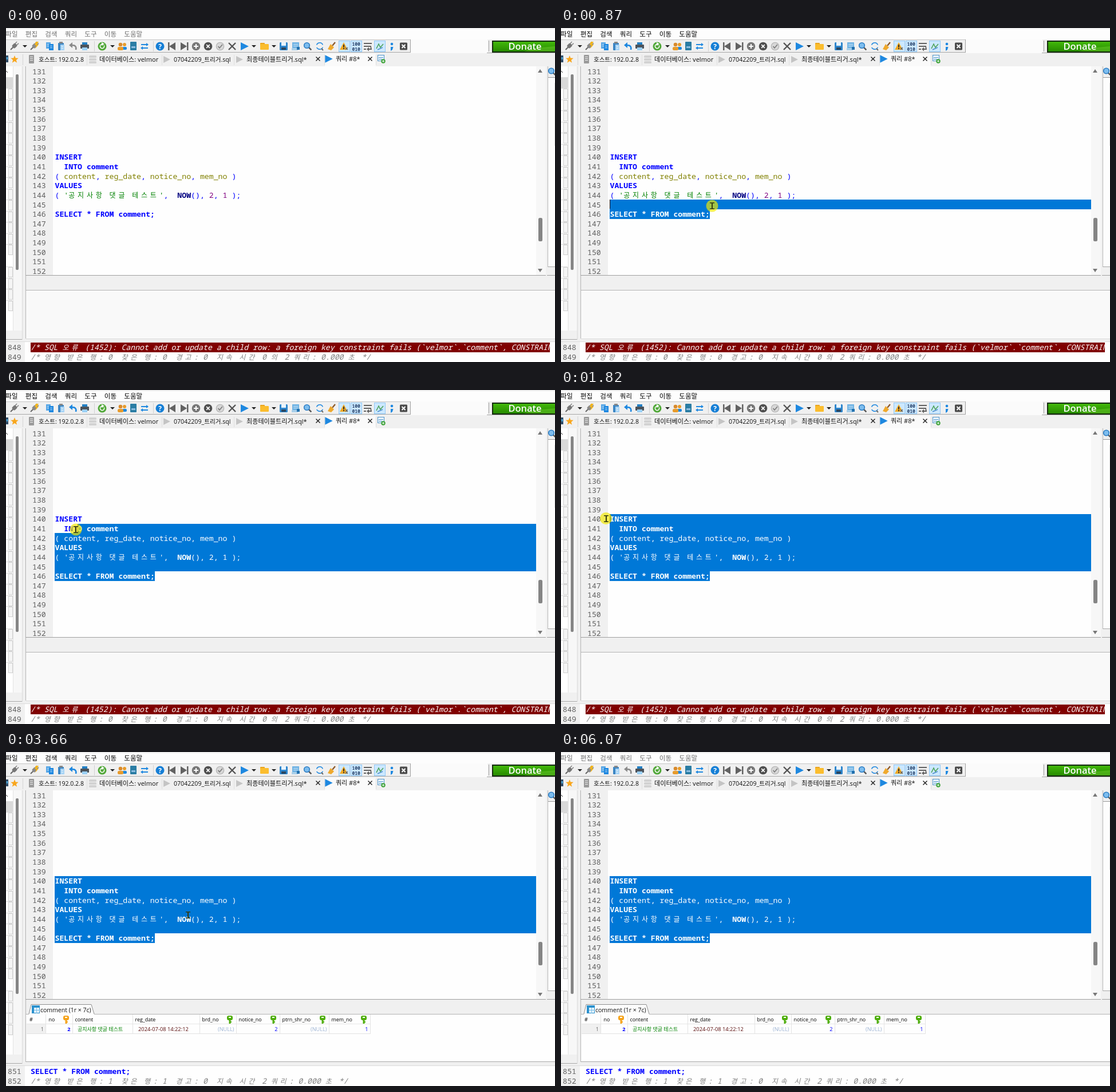
An HTML page with a canvas for the animation above (6.14 s loop, 959 by 584 pixels).

```html
<!DOCTYPE html>
<html lang="ko">
<head>
<meta charset="utf-8">
<style>
html, body { margin: 0; width: 100%; height: 100%; overflow: hidden; background: #f0f0f0; }
canvas { display: block; width: 959px; height: 584px; }
</style>
</head>
<body>
<canvas id="stage" width="959" height="584"></canvas>
<script>
const c = document.getElementById('stage').getContext('2d');
const LOOP = 6140;
const UI = "'Open Sans', 'Noto Sans CJK KR', sans-serif";
const MONO = "'Noto Sans Mono', 'Noto Sans CJK KR', monospace";
const CELL = 7.92, ROW = 16.64, CODE_X = 85.5;
const BLUE = '#0000ff', SEL = '#0078d7', GREY = '#f0f0f0', ICON = '#1e88e0';

// ---------- drawing helpers ----------
function box(x, y, w, h, fill, stroke) {
  if (fill) { c.fillStyle = fill; c.fillRect(x, y, w, h); }
  if (stroke) { c.strokeStyle = stroke; c.lineWidth = 1; c.strokeRect(x + .5, y + .5, w - 1, h - 1); }
}
function pill(x, y, w, h, r, fill) {
  c.fillStyle = fill;
  c.beginPath(); c.roundRect(x, y, w, h, r); c.fill();
}
function poly(pts, fill) {
  c.fillStyle = fill;
  c.beginPath();
  for (let i = 0; i < pts.length; i += 2) c.lineTo(pts[i], pts[i + 1]);
  c.closePath(); c.fill();
}
function line(pts, color, w = 1) {
  c.strokeStyle = color; c.lineWidth = w;
  c.beginPath();
  for (let i = 0; i < pts.length; i += 2) c.lineTo(pts[i], pts[i + 1]);
  c.stroke();
}
function disc(x, y, r, fill) {
  c.fillStyle = fill;
  c.beginPath(); c.arc(x, y, r, 0, 7); c.fill();
}
function arc(x, y, r, a, b, color, w) {
  c.strokeStyle = color; c.lineWidth = w;
  c.beginPath(); c.arc(x, y, r, a, b); c.stroke();
}
function label(s, x, y, size, color, weight = 400, align = 'left') {
  c.font = `${weight} ${size}px ${UI}`;
  c.fillStyle = color; c.textAlign = align;
  c.fillText(s, x, y);
  c.textAlign = 'left';
}
const isWide = ch => ch >= '가' && ch <= '힣';
// Monospaced text on a cell grid; Hangul takes two cells. Returns the next x.
function mono(s, x, y, color, style = '500') {
  c.fillStyle = color;
  for (const ch of s) {
    const wide = isWide(ch);
    c.font = `${wide ? style.replace('bold', '') : style} ${wide ? 12 : 13.2}px ${MONO}`;
    if (ch !== ' ') c.fillText(ch, x, y);
    x += wide ? 2 * CELL : CELL;
  }
  return x;
}
const play = (x, y, color, s = 1) => poly([x - 7 * s, y - 7 * s, x + 7 * s, y, x - 7 * s, y + 7 * s], color);
const drop = x => poly([x - 4, 30, x + 4, 30, x, 34], '#222');
const cross = (x, y, r, color, w) => {
  line([x - r, y - r, x + r, y + r], color, w);
  line([x + r, y - r, x - r, y + r], color, w);
};
function lens(x, y, r) {
  line([x + r * .5, y + r * .5, x + r + 3, y + r + 3], '#555', 2.5);
  disc(x, y, r, '#7dbdee'); arc(x, y, r, 0, 7, '#2c7dc4', 1.6);
}
function floppy(x, y) {
  pill(x - 7, y - 7, 14, 14, 1.5, '#2f86cc');
  box(x - 4, y - 7, 8, 6, '#e8f4ff'); box(x - 4, y + 2, 8, 4, '#2a4660');
}
function sheet(x, y, w, h, fill) {
  box(x, y, w, h, fill);
  for (let i = 3; i < h - 2; i += 3) box(x + 2, y + i, w - 4, 1, 'rgba(255,255,255,.7)');
}

// ---------- toolbar ----------
function plug(x, tone) {
  line([x - 6, 38, x - 1, 33], '#666', 2);
  c.save(); c.translate(x + 1, 31); c.rotate(-.8);
  pill(-4, -3.5, 8, 7, 2, tone);
  line([4, -2, 8, -2], '#777', 1.4); line([4, 2, 8, 2], '#777', 1.4);
  c.restore();
}
function undo(color) {
  poly([110, 30, 116, 25, 116, 35], color);
  c.strokeStyle = color; c.lineWidth = 2.6;
  c.beginPath(); c.moveTo(115, 30); c.quadraticCurveTo(124, 30, 122, 38); c.stroke();
}
function skip(x, dir) {
  poly([x - 5 * dir, 32, x + 6 * dir, 25, x + 6 * dir, 39], '#626262');
  box(x - 6 * dir - 1, 25, 2.5, 14, '#626262');
}
function swap(y, dir) {
  box(236, y - 1, 12, 2, ICON);
  const tip = dir > 0 ? 249 : 235;
  poly([tip, y, tip - 4 * dir, y - 3, tip - 4 * dir, y + 3], ICON);
}
function toolbar(menuOn, undoOn, busy) {
  box(0, 0, 959, 20, '#fdfdfd'); box(0, 0, 959, 2, '#ededed');
  const names = ['파일', '편집', '검색', '쿼리', '도구', '이동', '도움말'];
  names.forEach((s, i) => label(s, i * 34.5 - .7, 15, 11.5, menuOn ? '#000' : '#6d6d6d'));

  box(0, 20, 707, 24, GREY); box(707, 20, 133, 24, '#fbfbfb'); box(840, 20, 119, 24, GREY);
  box(0, 20, 707, 1, '#c4c4c4'); box(706, 20, 1, 23, '#a0a0a0');
  box(0, 42, 707, 1, '#a8a8a8'); box(840, 20, 1, 23, '#fff');
  box(843, 22, 1, 19, '#a0a0a0'); box(840, 43, 119, 1, '#a8a8a8');

  plug(14, '#777'); drop(33); plug(49, '#8a8a8a');
  poly([52, 24, 57, 24, 54, 29, 57, 29, 51, 36, 53, 30, 50, 30], '#f2b51c');
  sheet(70, 25, 8, 11, '#58a7e6'); sheet(75, 28, 8, 11, ICON);
  pill(91, 26, 10, 13, 1, '#3b86c4'); box(93, 24, 6, 3, '#888'); sheet(95, 29, 7, 10, '#a8d4f5');
  undo(undoOn ? ICON : '#8b8b8b');
  box(133, 25, 9, 5, '#2380c5'); pill(130, 29, 15, 7, 1, '#4c535a'); box(133, 34, 9, 5, '#9bd0f6');
  box(154, 23, 1, 18, '#d0d0d0'); box(257, 23, 1, 18, '#d0d0d0');
  disc(168, 32, 7.5, '#52a83a'); arc(168, 32, 3.6, -.5, 4.6, '#fff', 1.6); poly([167, 25, 172, 28, 167, 31], '#fff');
  drop(186);
  disc(207, 29, 3, '#e79b2b'); pill(203, 33, 8, 5, 2, ICON);
  disc(200, 29, 3.3, '#d98a2b'); pill(195, 33, 10, 6, 2.5, '#e79b2b');
  pill(217, 24, 11, 15, 1, '#2a7da4'); box(219, 32, 7, 3, '#8cbce0');
  swap(29, 1); swap(35, -1);

  disc(269, 32, 7.5, '#167fd6'); label('?', 269, 36.5, 12, '#fff', 700, 'center');
  skip(290, 1); skip(311, -1);
  disc(332, 32, 7.3, '#777'); box(328, 31, 8, 2, '#fff'); box(331, 28, 2, 8, '#fff');
  disc(353, 32, 7.3, '#4f4f4f'); cross(353, 32, 2.8, '#fff', 1.7);
  disc(374, 32, 7.3, '#b5b5b5'); disc(374, 32, 6, '#d8d8d8'); line([370.5, 32, 373, 35, 378, 29], '#7d7d7d', 1.7);
  cross(395, 32, 6, '#555', 2.4);
  play(417, 32, busy ? '#808080' : ICON); drop(433);
  pill(444, 26, 8, 4, 1, '#e9a41d'); pill(444, 28, 15, 10, 1, '#fbbd2e'); drop(468);
  floppy(485, 32);
  sheet(500, 25, 12, 10, '#6fb3e4'); box(499, 35, 11, 4, '#a9cfe9'); box(508, 33, 5, 5, '#2271ae');
  lens(525.5, 30.5, 4.8);
  arc(548, 31.5, 5.8, .4, 2.7, ICON, 1.6); arc(548, 31.5, 5.8, 3.5, 5.9, ICON, 1.6); line([551, 36, 554, 39], '#666', 2);
  line([575, 25, 570, 31], '#8d5a2b', 2.4); poly([567, 28, 573, 34, 568, 39, 562, 37], '#efa92d');
  for (const x of [581, 602, 643]) box(x, 22, 20, 20, '#cce8ff', '#90c8f6');
  poly([590, 25, 597, 38, 583, 38], '#f2aa24'); box(589, 29, 2, 5, '#333'); box(589, 35, 2, 2, '#333');
  if (busy) disc(595, 36, 3, '#e23a2c'); else cross(595, 36, 2, '#666', 1.3);
  c.font = `bold 8px ${MONO}`; c.fillStyle = '#26436b';
  c.fillText('100', 604.5, 31); c.fillText('010', 604.5, 39.5);
  box(625, 26, 14, 2, '#626262'); line([625, 32, 637, 32, 638, 37, 632, 37], '#626262', 1.8);
  box(625, 36, 4, 2, '#626262'); poly([630, 37, 634, 33.5, 634, 40.5], '#626262');
  line([647, 36, 651, 28, 654, 34, 659, 28], '#4fa35b', 1.6); line([649, 38, 658, 34], '#4d8ecb', 1.5);
  disc(674, 28, 2.3, ICON); poly([672, 33, 676.5, 33, 675, 38, 672, 40], ICON);
  pill(688, 25.5, 13, 13, 1.5, busy ? '#e8402c' : '#4b4b4b'); cross(694.5, 32, 3, '#fff', 1.9);

  const g = c.createLinearGradient(0, 24, 0, 41);
  g.addColorStop(0, '#42b80a'); g.addColorStop(1, '#278b00');
  box(849, 22, 110, 21, '#142b0b'); box(851, 24, 108, 17, g);
  poly([905, 41, 925, 35, 959, 32, 959, 41], 'rgba(130,220,60,.35)');
  label('Donate', 906.5, 38, 16.5, '#fff', 600, 'center');
}

function tabs() {
  box(0, 44, 959, 23, GREY);
  box(557, 45, 89, 22, '#fafafa');
  for (const x of [141, 272, 398, 556, 646]) box(x, 47, 1, 18, '#dedede');
  box(0, 48, 4, 12, '#314c68'); box(1, 51, 2, 4, '#51b6e8');
  const star = [];
  for (let i = 0; i < 10; i++) {
    const r = i % 2 ? 3 : 7, a = i * Math.PI / 5 - Math.PI / 2;
    star.push(15 + r * Math.cos(a), 55 + r * Math.sin(a));
  }
  poly(star, '#f8a61c');
  box(29, 46, 1, 19, '#d4d4d4');
  pill(40, 47, 9, 15, 1, '#9b9b9b');
  for (const y of [50, 53, 56]) box(42, y, 5, 1, '#eee');
  for (const y of [48, 53, 58]) pill(145, y, 13, 4, 1.5, '#d2d2d2');
  play(281, 55, '#c4c4c4', .85); play(408, 55, '#c4c4c4', .85); play(564, 54, ICON, .95);
  label('호스트: 192.0.2.8', 57, 59, 10.5, '#111');
  label('데이터베이스: velmor', 163, 59, 11.1, '#111');
  label('07042209_트리거.sql', 293, 59, 10.6, '#111');
  label('최종테이블트리거.sql*', 420, 59, 11.1, '#111');
  label('쿼리 #8*', 576, 58, 11, '#111');
  cross(545, 54, 3.5, '#222', 1.4); cross(636, 54, 3.5, '#222', 1.4);
  box(649, 47, 12, 11, '#eef7ff', '#4b92c7');
  line([651, 51.5, 659, 51.5], '#4b92c7'); line([651, 54.5, 657, 54.5], '#4b92c7');
  disc(659, 58, 3.7, '#3fa33a'); box(657, 57.5, 4, 1, '#fff'); box(658.5, 56, 1, 4, '#fff');
}

// ---------- side panels ----------
function sides() {
  box(0, 67, 28, 478, '#f7f7f7'); box(28, 67, 7, 478, GREY);
  box(0, 67, 12, 462, '#fff'); box(12, 67, 1, 462, '#e3e3e3');
  line([0, 75, 3, 78], '#333');
  box(0, 86, 12, 19, '#d9d9d9');
  for (let i = 0; i < 20; i++) {
    if (i === 15) continue;
    const y = Math.round(105 + i * 19.5);
    box(4, y + 1, 8, 18, '#f5f5f5', '#cfcfcf'); box(0, y, 11, 1, '#dcdcdc');
  }
  box(0, 529, 28, 15, GREY); box(0, 544, 28, 1, '#a8a8a8'); box(28, 67, 1, 478, '#dadada');
  pill(17, 81, 5, 342, 2, '#858585');

  box(943, 67, 16, 366, GREY);
  box(947, 86, 12, 332, '#fdfdfd'); box(946, 67, 1, 351, '#b8b8b8');
  box(947, 86, 12, 1, '#999'); box(947, 417, 12, 1, '#a6a6a6');
  lens(952.5, 75, 4.8);
  box(958, 96, 1, 110, '#e4e4e4');
}

// ---------- editor ----------
const K = 'bold';
const code = {
  140: [['INSERT', BLUE, K]],
  141: [['  INTO comment', BLUE, K]],
  142: [['( ', BLUE], ['content', '#808000'], [', ', BLUE], ['reg_date', '#808000'], [', ', BLUE],
        ['notice_no', '#808000'], [', ', BLUE], ['mem_no', '#808000'], [' )', BLUE]],
  143: [['VALUES', BLUE, K]],
  144: [['( ', BLUE], ["'공지사항 댓글 테스트'", '#008000'], [',  ', BLUE], ['NOW', '#000080', K],
        ['(), ', BLUE], ['2', '#800080'], [', ', BLUE], ['1', '#800080'], [' );', BLUE]],
  146: [['SELECT * FROM comment;', BLUE, K]]
};
const LAST = 146, LAST_COL = 22;
const rowTop = n => 217.7 + (n - 140) * ROW;
const baseline = n => Math.round(rowTop(n) + 12.6);
function codeRow(n, color) {
  let x = CODE_X;
  for (const [s, tone, style] of code[n] || []) x = mono(s, x, baseline(n), color || tone, style);
}
function editor(anchor, caretOn) {
  box(35, 67, 908, 366, '#fefefe');
  box(36, 67, 46, 365, GREY); box(34, 67, 1, 366, '#a8a8a8');
  box(926, 67, 17, 365, '#f7f7f7');
  poly([929, 78, 937, 78, 933, 72], '#777'); poly([929, 421, 937, 421, 933, 427], '#777');
  pill(930, 332, 7, 41, 2.5, '#858585');
  for (let n = 131; n <= 152; n++) {
    mono(String(n), 46, baseline(n), '#606060');
    codeRow(n);
  }
  if (!anchor) return;
  const { row, col } = anchor;
  for (let n = row; n <= LAST; n++) {
    const x0 = Math.round(85 + (n === row ? col * CELL : 0));
    const x1 = n === LAST ? Math.round(85.8 + LAST_COL * CELL) : 926;
    if (x1 - x0 < 2) continue;
    const y0 = Math.floor(rowTop(n)), y1 = Math.floor(rowTop(n + 1));
    c.save();
    c.beginPath(); c.rect(x0, y0, x1 - x0, y1 - y0); c.clip();
    box(x0, y0, x1 - x0, y1 - y0, SEL);
    codeRow(n, '#fff');
    c.restore();
  }
  if (caretOn) box(Math.round(85 + col * CELL), Math.floor(rowTop(row)), 1, 16, '#111');
}
function ghosts() {
  for (const [x, y] of [[178, 138], [214, 156]]) {
    box(36, y, x - 36, 1, '#9a9a9a'); box(x, 69, 1, y - 68, '#c0c0c0');
  }
}

// ---------- results and log ----------
function key(x, color) {
  pill(x - 5, 461, 10, 8, 3, color); box(x - 1.5, 468, 3, 7, color);
  box(x + 1, 471, 2, 2, color); box(x - 2, 463, 4, 2, '#fff');
}
// name, left edge, key colour, value, value colour
const GREEN = '#4fae0c', NONE = '#9db4d4';
const cols = [
  ['no', 70, '#f5a31a', '2', BLUE], ['content', 116, '', '', ''], ['reg_date', 221, '', '', ''],
  ['brd_no', 338, GREEN, '(NULL)', NONE], ['notice_no', 402, GREEN, '2', BLUE],
  ['ptrn_shr_no', 478, GREEN, '(NULL)', NONE], ['mem_no', 564, GREEN, '1', BLUE]
];
function results(done, ran) {
  box(35, 433, 924, 26, GREY); box(34, 432, 909, 1, '#a0a0a0'); box(945, 432, 14, 1, '#a0a0a0');
  box(35, 459, 924, 84, done ? '#fefefe' : '#f9f9f9');
  box(35, 458, 924, 1, '#b4b4b4'); box(34, 433, 1, 110, '#b4b4b4');
  box(29, ran ? 542 : 543, 930, 8, GREY);
  box(35, ran ? 541 : 543, 924, 1, ran ? '#a8a8a8' : '#dadada');
  if (!done) return;

  poly([40, 459, 44, 441, 149, 441, 154, 459], '#fcfcfc');
  line([40, 458, 44, 441.5, 149, 441.5, 154, 458], '#8f8f8f');
  box(45, 443, 14, 14, '#e4f4ff', '#2b91cd'); box(45, 443, 14, 4, '#2b91cd'); box(45, 443, 4, 14, '#2b91cd');
  line([53.5, 447, 53.5, 457], '#7dbfe5'); line([49, 451.5, 59, 451.5], '#7dbfe5');
  label('comment (1r × 7c)', 60, 454.5, 10.5, '#111');

  box(36, 476, 34, 17, GREY);
  box(36, 475, 600, 1, '#e6e6e6'); box(36, 492, 600, 1, '#e2e2e2');
  label('#', 41, 471, 9, '#000', 500);
  label('1', 66, 488, 9.2, '#666', 400, 'right');
  cols.forEach(([name, x, tone, value, color], i) => {
    const right = i < 6 ? cols[i + 1][1] : 636;
    box(right, 459, 1, 34, '#e4e4e4');
    label(name, x + 4.5, 471, 8.9, '#000', 500);
    if (tone) key(right - 11, tone);
    label(value, right - 3.5, 488, 9.2, color, i ? 400 : 700, 'right');
  });
  box(69, 459, 1, 34, '#e4e4e4');
  label('공지사항 댓글 테스트', 125, 487.5, 9, '#008000', 500);
  label('2024-07-08 14:22:12', 231, 488, 9.3, '#5c1010', 500);
}
function log(done) {
  box(0, 549, 959, 35, '#fefefe'); box(0, 549, 33, 35, GREY); box(0, 548, 959, 1, '#dcdcdc');
  const first = done ? 851 : 848;
  mono(String(first), 3, 563, '#606060'); mono(String(first + 1), 3, 580, '#606060');
  if (done) {
    mono('SELECT * FROM comment;', 43, 563, BLUE, K);
    mono('/* 영향 받은 행: 1  찾은 행: 1  경고: 0  지속 시간 2 쿼리: 0.000 초 */', 43, 580, '#808080', 'italic');
    return;
  }
  c.save();
  c.beginPath(); c.rect(43, 550, 907, 17); c.clip();
  box(43, 550, 907, 17, '#800000');
  mono('/* SQL 오류 (1452): Cannot add or update a child row: a foreign key constraint fails ' +
    '(`velmor`.`comment`, CONSTRAINT', 43, 563, '#fff', 'italic 500');
  c.restore();
  mono('/* 영향 받은 행: 0  찾은 행: 0  경고: 0  지속 시간 0 의 2 쿼리: 0.000 초 */', 43, 580, '#808080', 'italic');
}

// ---------- pointer ----------
// start, end, steps, then points as [progress, x, y]
const moves = [
  [70, 400, 6, [[0, 1000, 592], [.5, 520, 420], [1, 264, 326]]],
  [730, 1340, 10, [[0, 264, 326], [.3, 264, 311], [.8, 122, 244], [1, 95, 240]]],
  [1410, 1550, 3, [[0, 95, 240], [1, 90, 225]]],
  [1820, 1890, 2, [[0, 80, 224.5], [.5, 78.5, 224.5], [1, 78, 224]]],
  [2090, 2440, 6, [[0, 78, 224], [.5, 240, 266], [1, 318, 285]]],
  [5450, 5650, 4, [[0, 318, 285], [1, 902, 566]]]
];
function pointer(t) {
  const m = moves.filter(v => t >= v[0]).pop();
  if (!m || t >= 5720) return null;
  const [t0, t1, n, pts] = m;
  const step = Math.min(n - 1, Math.floor((t - t0 + 6) / ((t1 - t0) / (n - 1))));
  const p = (step + 1) / n;
  const i = Math.max(1, pts.findIndex(q => q[0] >= p - 1e-6));
  const [a, ax, ay] = pts[i - 1], [b, bx, by] = pts[i];
  const k = (p - a) / (b - a);
  return { x: ax + (bx - ax) * k, y: ay + (by - ay) * k };
}
function drawPointer({ x, y }, pressed) {
  if (pressed) disc(x, y, 10.5, 'rgba(242,232,0,.68)');
  x = Math.round(x); y = Math.round(y);
  if (y > 432 && y < 549) {
    poly([x, y, x, y + 16, x + 4, y + 12, x + 11, y + 11], '#222');
    poly([x + 1, y + 3, x + 1, y + 13, x + 4, y + 10, x + 8, y + 10], '#fff');
    return;
  }
  const ink = '#343a10';
  box(x - 1, y - 6, 2, 12, ink);
  box(x - 4, y - 6, 8, 1.5, ink); box(x - 4, y + 4.5, 8, 1.5, ink);
}
function selectionAt(t, pos) {
  if (t < 730) return null;
  if (t >= 1550) return { row: 140, col: 0 };
  const row = Math.min(LAST, Math.floor(140 + (pos.y - 217.7) / ROW));
  const len = { 140: 6, 141: 14, 142: 40, 143: 6, 144: 41, 145: 0, 146: LAST_COL }[row];
  return { row, col: Math.max(0, Math.min(len, Math.round((pos.x - CODE_X) / CELL))) };
}

function draw(t) {
  const pos = pointer(t);
  const busy = t >= 2970 && t < 3130, done = t >= 3130;
  const caretOn = t < 3130 || (t < 5720 && Math.floor((t - 3130) / 530) % 2 === 0);
  box(0, 0, 959, 584, GREY);
  toolbar(t >= 200 && t < 6000, t >= 730 && t < 6000, busy);
  tabs();
  sides();
  editor(selectionAt(t, pos), caretOn);
  if (t >= 3040 && t < 3130) ghosts();
  results(done, t >= 2970);
  log(done);
  if (pos) drawPointer(pos, t >= 730 && t < 2090);
}

const begin = performance.now();
function tick() {
  draw((performance.now() - begin) % LOOP);
  requestAnimationFrame(tick);
}
tick();
</script>
</body>
</html>
```
